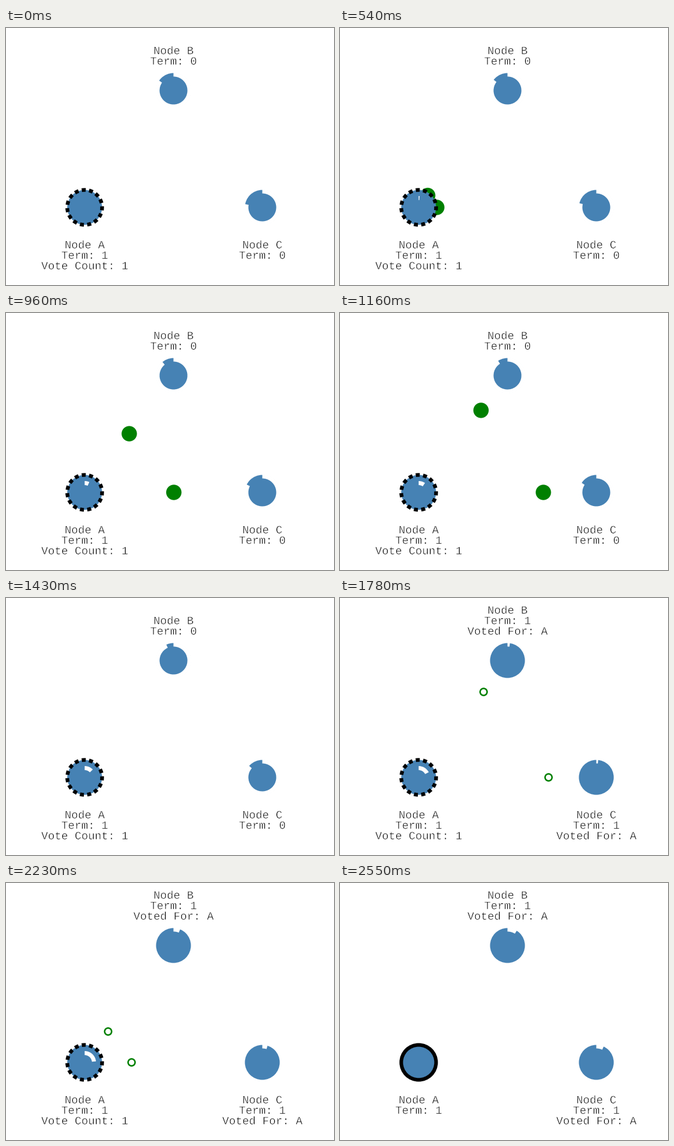
A matplotlib script for the animation above (3050 ms loop, 565 by 442 pixels).

```python
import numpy as np
import matplotlib.pyplot as plt
from matplotlib.animation import FuncAnimation
from matplotlib.patches import Circle, Wedge
from matplotlib.patheffects import Stroke

W, H, DPI = 565, 442, 64
PX = 72 / DPI                      # points per pixel
LOOP, TICK = 3050, 10              # ms
STEPS, VOTE, LEADER = 41, 21, 41   # steps where votes are cast and the leader is known
BLUE, GREEN = "#4682b4", "#008000"
A, B, C = np.array([(135.5, 308.5), (288.5, 107.5), (441.5, 308.5)])

# start time of every step: 50 ms apart, with three slightly longer holds
gaps = np.full(STEPS, 50)
gaps[0] = 490
gaps[[2, 18, 35]] = 70
starts = np.cumsum(gaps)

fig = plt.figure(figsize=(W / DPI, H / DPI), dpi=DPI, facecolor="white")
ax = fig.add_axes([0, 0, 1, 1])
ax.set_xlim(0, W)
ax.set_ylim(H, 0)
ax.axis("off")

# a white outline over the filled glyphs gives thin letters
thin = [Stroke(linewidth=0.6 * PX, foreground="white")]


def disc(pos, r, z, **style):
    return ax.add_patch(Circle(pos, r, zorder=z, **style))


def gap(pos, r, inner):
    """White clock arc that grows clockwise from the top."""
    return ax.add_patch(Wedge(pos, r, -90, -89, width=r - inner,
                              fc="white", lw=0, zorder=4))


def turn(wedge, angle):
    wedge.set_visible(angle > 0)
    wedge.set_theta2(-90 + angle)


def label(x, y):
    return ax.text(x, y, "", family="Liberation Mono", size=19.2 * PX,
                   color="black", ha="center", va="baseline", zorder=6,
                   path_effects=thin)


def write(labels, lines):
    for text, line in zip(labels, lines):
        text.set_text(line)


requests = [disc(A, 13.2, 1, fc=GREEN, lw=0) for _ in "BC"]
replies = [disc(p, 6, 1, fc="white", ec=GREEN, lw=2.6 * PX) for p in (B, C)]

for pos in (A, B, C):
    disc(pos, 30, 3, fc=BLUE, lw=0)
clock_a = gap(A, 19.5, 12.5)
clock_b, clock_c = gap(B, 30.7, 24), gap(C, 30.7, 24)

ring = disc(A, 30, 5, fill=False, ec="black", lw=6.2 * PX)
dashes = [ax.add_patch(Wedge(A, 33.2, a - 3.5, a + 9.5, width=6.4,
                             fc="black", lw=0, zorder=5))
          for a in range(0, 360, 24)]

text_a = [label(A[0], y) for y in (379, 397, 415)]
text_b = [label(B[0], y) for y in (27, 45, 63)]
text_c = [label(C[0], y) for y in (379, 397, 415)]


def draw(frame):
    k = int(np.searchsorted(starts, frame * TICK, side="right"))
    voted, leading = k >= VOTE, k >= LEADER

    out = 0.05 * (k + 0.04)
    back = 0.0519 * (k - 20.82)
    for request, reply, node in zip(requests, replies, (B, C)):
        request.set_center(A + (node - A) * out)
        request.set_visible(0 < k < VOTE)
        reply.set_center(node + (A - node) * back)
        reply.set_visible(voted and not leading)

    turn(clock_a, 0 if leading else 2.42 * k)
    turn(clock_b, 1.6 * (k - VOTE) if voted else 304.5 + 1.64 * k)
    turn(clock_c, 1.25 * (k - VOTE) if voted else 280.6 + 1.6 * k)

    ring.set_visible(leading)
    for dash in dashes:
        dash.set_visible(not leading)

    write(text_a, ["Node A", "Term: 1", "" if leading else "Vote Count: 1"])
    if voted:
        write(text_b, ["Node B", "Term: 1", "Voted For: A"])
        write(text_c, ["Node C", "Term: 1", "Voted For: A"])
    else:
        write(text_b, ["", "Node B", "Term: 0"])
        write(text_c, ["Node C", "Term: 0", ""])
    return []


anim = FuncAnimation(fig, draw, frames=LOOP // TICK, interval=TICK,
                     init_func=lambda: draw(0), repeat=True, repeat_delay=0)
plt.show()
```
